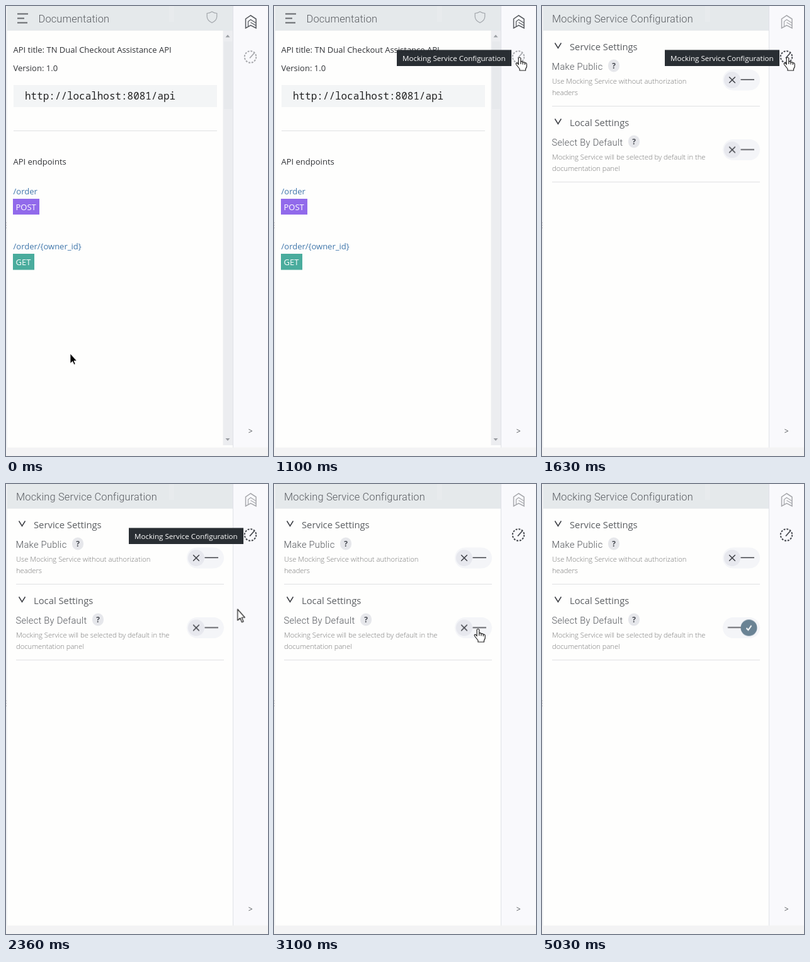
Animation, 416 px wide and 712 px high, one loop 5500 ms. Source, as an HTML page:

```html
<!DOCTYPE html>
<html lang="en">
<head>
<meta charset="utf-8">
<title>Mocking service settings</title>
<style>
html, body { margin: 0; width: 100%; height: 100%; overflow: hidden; background: #fefefd; }
svg { display: block; width: 100%; height: 100%; }
text { font-family: "Open Sans", sans-serif; font-size: 13px; fill: #303236; white-space: pre; }
.title { font: 300 16.4px Roboto, sans-serif; letter-spacing: .16px; fill: #595c61; }
.label { font: 300 14.7px Roboto, sans-serif; letter-spacing: .25px; fill: #54575c; }
.section { font-size: 14.8px; fill: #5b5e62; }
.hint { font-size: 11.2px; font-weight: 300; fill: #777; }
.url { font: 15.95px "Noto Sans Mono", monospace; fill: #222; }
.link { fill: #3f76ab; }
.light { fill: #fff; }
.help { font-size: 12px; font-weight: 700; fill: #4c4f57; text-anchor: middle; }
.line { fill: none; stroke: #3c3e44; stroke-width: 1.5; }
.rule { stroke: #e0e1e3; }

/* one loop is 5500 ms, so 1% is 55 ms */
.a { animation: 5500ms linear infinite both; }
.panel { animation-name: panel; }
.tip { animation-name: tip; }
.docs-icon { animation-name: dim; }
.gear-icon { animation-name: lit; }
.cursor { animation-name: move; }
.black { animation-name: black; }
.white { animation-name: white; }
.hand { animation-name: hand; }
.knob { animation-name: knob; }
.dash { animation-name: dash; }
.on { animation-name: on; }
.off { animation-name: off; }

@keyframes panel { 0%, 23.6% { opacity: 0; } 27.3%, 100% { opacity: 1; } }
@keyframes dim { 0%, 23.6% { opacity: 1; } 27.3%, 100% { opacity: .5; } }
@keyframes lit { 0%, 23.6% { opacity: .45; } 27.3%, 100% { opacity: 1; } }
@keyframes tip {
  0%, 15.2% { opacity: 0; }
  18%, 46.5% { opacity: .97; }
  50%, 100% { opacity: 0; }
}
@keyframes move {
  0%, .55% { transform: translate(102px, 550px); animation-timing-function: cubic-bezier(.4, .1, .7, .8); }
  10.2% { transform: translate(359px, 190px); animation-timing-function: cubic-bezier(.2, .5, .5, 1); }
  15.2%, 35.6% { transform: translate(390px, 81px); animation-timing-function: ease-in; }
  42.9% { transform: translate(368px, 198px); animation-timing-function: ease-out; }
  50%, 100% { transform: translate(324px, 229px); }
}
@keyframes black { 0%, 14.4% { opacity: 1; } 14.41%, 100% { opacity: 0; } }
@keyframes white { 0%, 38% { opacity: 0; } 38.01%, 47% { opacity: 1; } 47.01%, 100% { opacity: 0; } }
@keyframes hand {
  0%, 14.4% { opacity: 0; }
  14.41%, 38% { opacity: 1; }
  38.01%, 47% { opacity: 0; }
  47.01%, 85.5% { opacity: 1; }
  90.4%, 100% { opacity: 0; }
}
@keyframes knob {
  0%, 67.3% { transform: translateX(0); animation-timing-function: ease-in-out; }
  72.2%, 100% { transform: translateX(26px); }
}
@keyframes dash {
  0%, 67.3% { transform: translateX(0); animation-timing-function: ease-in-out; }
  72.2%, 100% { transform: translateX(-20.5px); }
}
@keyframes on { 0%, 67.3% { opacity: 0; } 72.2%, 100% { opacity: 1; } }
@keyframes off { 0%, 67.3% { opacity: 1; } 72.2%, 100% { opacity: 0; } }
</style>
</head>
<body>
<svg viewBox="0 0 416 712" preserveAspectRatio="none">
  <defs>
    <rect id="pill" x="-15" y="-16.5" width="59" height="33" rx="16.5" fill="#f4f5f8"/>
    <path id="dash" class="line" d="M13.5-.5H35"/>
    <g id="off">
      <circle r="13" fill="#e7e8ee"/>
      <path class="line" d="M-4.8-4.8L4.8 4.8M4.8-4.8L-4.8 4.8"/>
    </g>
    <path id="chevron" class="line" d="M-5-4L0 4 5-4"/>
    <g id="help">
      <rect x="-9" y="-10" width="18" height="20" rx="9" fill="#e6e7eb"/>
      <text class="help" y="4.3">?</text>
    </g>
  </defs>

  <rect width="416" height="712" fill="#fefefd"/>

  <!-- documentation panel -->
  <g>
    <rect x="2" width="359" height="39" fill="#e5e9eb"/>
    <path d="M18 12.5H35M18 19.5H29M18 26.5H34" stroke="#66696d" stroke-width="1.8"/>
    <text class="title" x="51.5" y="26">Documentation</text>
    <path d="M327 9Q331 11.5 334.8 11.5V17Q334.5 23 327 26.5 319.5 23 319.2 17V11.5Q323 11.5 327 9Z" fill="none" stroke="#a2a6ab" stroke-width="1.2"/>
    <text x="11.5" y="73.5">API title: TN Dual Checkout Assistance API</text>
    <text x="11.5" y="102.5">Version: 1.0</text>
    <rect x="12" y="125" width="323" height="35" fill="#f3f5f6"/>
    <text class="url" x="30" y="148">http://localhost:8081/api</text>
    <path class="rule" d="M12 197.5H335"/>
    <text x="11.5" y="251">API endpoints</text>
    <text class="link" x="11.5" y="297.5">/order</text>
    <rect x="11" y="305" width="42" height="25" fill="#916aeb"/>
    <text class="light" x="15.5" y="322.5">POST</text>
    <text class="link" x="11.5" y="385">/order/{owner_id}</text>
    <rect x="11" y="392" width="34" height="25.5" fill="#4aac9d"/>
    <text class="light" x="15.5" y="410">GET</text>
    <rect x="344.5" y="39" width="16.5" height="656" fill="#ecedf0"/>
    <rect x="346" y="56" width="13.5" height="107" fill="#e7e9ec"/>
    <path d="M348.5 49.5L352 45.5 355.5 49.5ZM348.5 684L352 688 355.5 684Z" fill="#9a9da2"/>
  </g>

  <!-- settings panel -->
  <g class="a panel">
    <rect x="2" width="359" height="699" fill="#fefefd"/>
    <rect x="2" width="359" height="39" fill="#e5e9eb"/>
    <text class="title" x="16" y="26">Mocking Service Configuration</text>

    <use href="#chevron" x="25.5" y="62.5"/>
    <text class="section" x="44" y="69.5">Service Settings</text>
    <text class="label" x="15.5" y="100.5">Make Public</text>
    <use href="#help" x="114" y="94.5"/>
    <text class="hint" x="16" y="122.5">Use Mocking Service without authorization</text>
    <text class="hint" x="16" y="140.5">headers</text>
    <g transform="translate(302 117)">
      <use href="#pill"/><use href="#dash"/><use href="#off"/>
    </g>
    <path class="rule" d="M16 158.5H346"/>

    <use href="#chevron" x="25.5" y="182.5"/>
    <text class="section" x="44" y="189.5">Local Settings</text>
    <text class="label" x="15.5" y="220.5">Select By Default</text>
    <use href="#help" x="146" y="214.5"/>
    <text class="hint" x="16" y="242.5">Mocking Service will be selected by default in the</text>
    <text class="hint" x="16" y="260.5">documentation panel</text>
    <g transform="translate(302 227.5)">
      <use href="#pill"/>
      <g class="a dash"><use href="#dash"/></g>
      <g class="a knob">
        <g class="a off"><use href="#off"/></g>
        <g class="a on">
          <circle cx=".5" r="13" fill="#6a8394"/>
          <path d="M-3.5.5L-.5 3.5 4.5-3.5" fill="none" stroke="#fff" stroke-width="2"/>
        </g>
      </g>
    </g>
    <path class="rule" d="M16 278.5H346"/>
  </g>

  <!-- frame and side bar -->
  <rect x="259" width="8" height="25" fill="#e8ebed"/>
  <rect width="2" height="712" fill="#f0f1f3"/>
  <path d="M.5 342V353" stroke="#ccc" stroke-dasharray="2 2"/>
  <rect x="361" width="55" height="699" fill="#f9f9fc"/>
  <path d="M360.5 0V699" stroke="#e0e2e8"/>
  <rect y="698.5" width="416" height="13.5" fill="#f3f3f4"/>
  <g class="a docs-icon" fill="none" stroke="#55585d" stroke-width="1.5">
    <path d="M380.5 35V20.5L388.5 15 397 20.5V35L388.5 30.5Z"/>
    <path d="M384.5 32V24.5L388.5 21.5 397 27M388.5 26L397 31" stroke-width="1.2"/>
  </g>
  <g class="a gear-icon" fill="none" stroke="#45484e">
    <circle cx="388" cy="80.5" r="9.2" stroke-width="2" stroke-dasharray="2.9 1.92"/>
    <path d="M387 82.5L394.5 74" stroke-width="1.8"/>
  </g>
  <text x="384.7" y="676.5" style="font-size:12px;fill:#55585c">&gt;</text>

  <g class="a tip">
    <rect x="195" y="69.5" width="182" height="25.5" fill="#23282d"/>
    <text class="light" x="204" y="86.5" style="font-size:11.6px">Mocking Service Configuration</text>
  </g>

  <g class="a cursor" stroke-linejoin="round">
    <path class="a black" d="M0 0V15.5L3.7 12.3 6 17.5 8.2 16.5 6 11.5H10.5Z" fill="#000" stroke="#fff" stroke-width=".8"/>
    <path class="a white" d="M0 0V17.5L4 14 6.8 20.5 9.3 19.5 6.5 13H11.5Z" fill="#fff" stroke="#222" stroke-width="1.2"/>
    <g class="a hand" stroke="#222" stroke-width="1.2">
      <path d="M-1.8 1.5Q0-1 1.8 1.5V7Q4 5.8 5 8 7.5 7 8.3 9 11 8.4 11.2 11V15Q10.5 17 9.5 18.5V21H0V18.5Q-2 16-5.5 11.5-6.5 9-4 9.2L-1.8 11.5Z" fill="#fff"/>
      <path d="M1.8 7V11M5 8V11.5M8.3 9V12" fill="none"/>
    </g>
  </g>
</svg>
</body>
</html>
```
